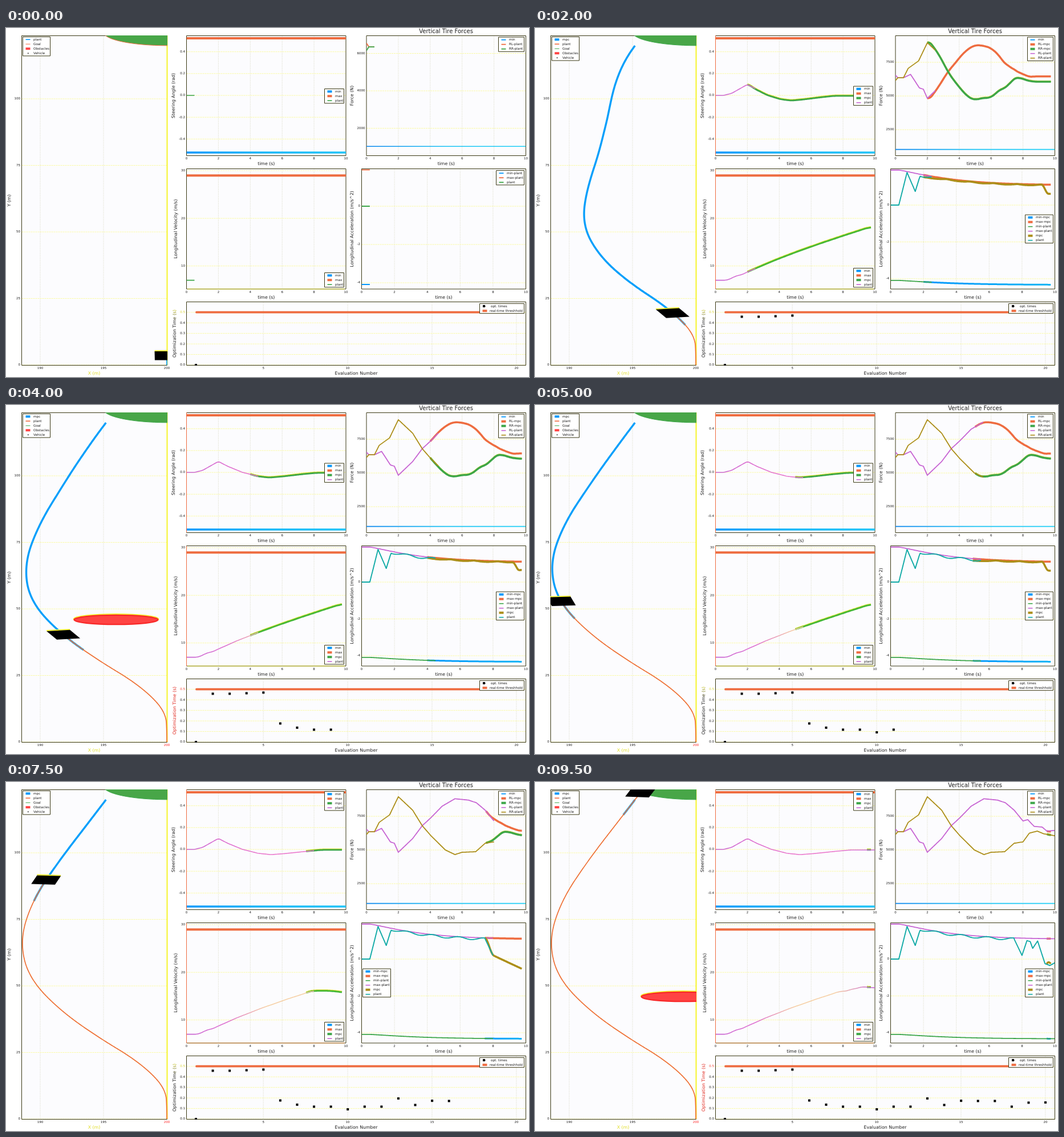
An HTML page with a canvas that plays this animation: 917x611 px, repeating every 10 s.

```html
<!DOCTYPE html>
<html lang="en">
<head>
<meta charset="utf-8">
<title>Vertical Tire Forces</title>
<style>
html, body { margin: 0; width: 100%; height: 100%; overflow: hidden; background: #fff; }
canvas { display: block; }
</style>
</head>
<body>
<canvas id="stage" width="917" height="611"></canvas>
<script>
const ctx = document.getElementById('stage').getContext('2d');
const FONT = '"DejaVu Sans", sans-serif';
const BLUE = '#0498fc', ORANGE = '#ee6c40', GREEN = '#3ca648', PURPLE = '#c765d3', GOLD = '#ac8e18',
  TEAL = '#10aaa6', RED = '#ff4444', YELLOW = '#f6f428', INK = '#1c1c1c', FRAME = '#3a3814';

const lerp = (a, b, u) => a + (b - a) * u;
const ease = u => {
  u = Math.min(Math.max(u, 0), 1);
  return u * u * (3 - 2 * u);
};

// Straight segments through t, value pairs
function keys(...p) {
  return t => {
    let i = 0;
    while (i < p.length - 4 && t > p[i + 2]) i += 2;
    const u = (t - p[i]) / (p[i + 2] - p[i]);
    return lerp(p[i + 1], p[i + 3], Math.min(Math.max(u, 0), 1));
  };
}
function soften(f, w) {
  return t => {
    let sum = 0;
    for (let i = -5; i <= 5; i++) sum += f(t + w * i / 5);
    return sum / 11;
  };
}

// The drive: acceleration and heading give speed and position
const settle = t => Math.exp(-((Math.max(0, t - .5) / 3.3) ** 1.2));
const accMax = t => 1.08 + .82 * settle(t);
const accMin = t => -4.33 + .24 * settle(t);
const launch = keys(0, 0, .5, 0, 1, 1.77, 1.5, .74, 1.8, 1.6);
const brake = keys(7.5, 1.13, 8, .2, 8.3, 1, 8.5, .95, 8.65, .58, 8.95, .98, 9.4, -.25, 9.7, -.35, 10, -.2);
const accel = t => t < 1.8 ? launch(t) : t > 7.5 ? brake(t) : accMax(t) - .06 * (1 + Math.sin(4 * t));
const heading = keys(0, 0, 1, .01, 2, .19, 3.2, .335, 4, .295, 5, .2, 6, .05, 7, -.065, 8, -.14, 9, -.162, 10, -.16);
const steer = soften(keys(.5, 0, 1, .018, 2, .1, 2.6, .055, 3.5, .001, 4.5, -.036, 5.3, -.048, 6.2, -.038, 7.5, -.018, 8.5, -.005), .1);
const rearL = keys(0, 6.55, .15, 6.35, .5, 6.35, .95, 6.6, 1.5, 5.6, 1.75, 5.5, 2, 4.83, 2.9, 5.85, 3.5, 6.8, 4.05, 7.4,
  4.75, 8.25, 5.55, 8.8, 6.4, 8.7, 6.9, 8.5, 7.45, 7.95, 8, 7.15, 8.3, 7.25, 8.7, 6.75, 9.2, 6.7, 9.5, 6.4, 10, 6.45);
const rearR = keys(0, 6.15, .15, 6.35, .5, 6.35, .8, 7.05, 1.45, 7.6, 2, 8.95, 2.9, 7.95, 3.5, 6.8, 4.05, 6.05, 4.95, 5,
  5.55, 4.66, 6, 4.83, 6.85, 4.87, 7.45, 5.5, 8, 5.6, 8.4, 6.25, 8.9, 6.4, 9.3, 6.2, 10, 6.05);

const DT = .02, run = [];
for (let i = 0, x = 200, y = 0, v = 7; i <= 550; i++) {
  const t = i * DT, a = heading(t);
  run.push({ x, y, v });
  x -= v * Math.sin(a) * DT;
  y += v * Math.cos(a) * DT;
  v += accel(t) * DT;
}
const at = t => run[Math.round(t / DT)];
const speed = t => at(t).v;

// The first plans swerve hard
const first = {
  steer: soften(keys(1, .02, 1.6, .068, 2.85, .173, 3.7, .207, 5.5, .12, 7.35, .016, 10, -.094), .2),
  left: soften(keys(1, 6.65, 2.85, 2.4, 3.7, 2.2, 5.45, 3.27, 6.25, 4.45, 7.35, 5.7, 7.7, 5.75, 10, 7.3), .1),
  right: soften(keys(1, 7.2, 1.57, 7.86, 2.85, 9.95, 3.7, 10.65, 4.55, 10.2, 5.45, 9.25, 6.25, 7.6, 7.4, 6.15, 10, 5.35), .1),
  accel: keys(1, 1.7, 1.55, .58, 2.85, -.35, 3.7, .32, 4.57, .51, 6.85, -1.19, 7.4, -1.12, 10, -.05),
  max: keys(1, 1.76, 5.4, 1.67, 8.4, 2, 10, 2.07),
  min: keys(1, -4.13, 5, -4.18, 10, -4.04)
};

// A plan leaves the driven curve where it starts
function join(actual, plan, t0) {
  const gap = actual(t0) - plan(t0);
  return t => plan(t) + gap * Math.exp(-1.5 * (t - t0));
}
// Later plans foresee the drive, a little too fast
function foresee(actual, w, early, k) {
  const t0 = k / 2, soft = soften(actual, w);
  return join(actual, k < 3 ? early : t => soft(t0 + (t - t0) * (1 + .8 / k)), t0);
}
function planAccel(k) {
  const t0 = k / 2;
  if (k < 3) return join(accel, first.accel, t0);
  const push = t => accMax(t) - .05 * Math.abs(Math.sin(2.2 * (t - t0))) - .45 * ease((t - 9.2) / .4);
  const slow = t => accMax(t) - .93 * ease((t - t0) / .55) - .4 * Math.max(0, t - t0 - .5);
  return join(accel, k < 15 ? push : slow, t0);
}
function planSpeed(k) {
  const a = planAccel(k);
  return t => {
    let v = speed(k / 2);
    for (let s = k / 2; s < t - .01; s += .05) v += a(s) * .05;
    return v;
  };
}

function stroke(pts, color, w) {
  ctx.beginPath();
  pts.forEach(p => ctx.lineTo(p[0], p[1]));
  ctx.strokeStyle = color;
  ctx.lineWidth = w;
  ctx.stroke();
}
const line = (x1, y1, x2, y2, color, w) => stroke([[x1, y1], [x2, y2]], color, w);

function text(s, x, y, size, align = 'center', color = INK) {
  ctx.font = size + 'px ' + FONT;
  ctx.textAlign = align;
  ctx.textBaseline = 'middle';
  ctx.fillStyle = color;
  ctx.fillText(s, x, y);
}
function upright(s, x, y, color) {
  ctx.save();
  ctx.translate(x, y);
  ctx.rotate(-Math.PI / 2);
  text(s, 0, 0, 7.8, 'center', color);
  ctx.restore();
}
function gradient(l, r, ...colors) {
  const g = ctx.createLinearGradient(l, 0, r, 0);
  colors.forEach((c, i) => g.addColorStop(i / (colors.length - 1), c));
  return g;
}
function ellipse(x, y, rx, ry, fill, edge, w) {
  ctx.beginPath();
  ctx.ellipse(x, y, rx, ry, 0, 0, 7);
  ctx.fillStyle = fill;
  ctx.fill();
  ctx.strokeStyle = edge;
  ctx.lineWidth = w;
  ctx.stroke();
}

// xs and ys hold [pixel, label] ticks
function panel(l, t, r, b, xs, ys) {
  ctx.fillStyle = '#fcfcfe';
  ctx.fillRect(l, t, r - l, b - t);
  ctx.setLineDash([1, 2]);
  for (const [x, s, c] of xs) {
    if (x > l + 1 && x < r - 1) line(x, t, x, b, '#cfcfb4', 1);
    text(s, x, b + 5.3, 5.5, 'center', c);
  }
  ctx.setLineDash([3, 1]);
  for (const [y, s, c] of ys) {
    line(l, y, r, y, '#fbfaa6', 1);
    text(s, l - 2.5, y, 5.5, 'right', c);
  }
  ctx.setLineDash([]);
  ctx.strokeStyle = FRAME;
  ctx.lineWidth = 1;
  ctx.strokeRect(l, t, r - l, b - t);
}
function inside(l, t, r, b, draw) {
  ctx.save();
  ctx.beginPath();
  ctx.rect(l, t, r - l, b - t);
  ctx.clip();
  draw();
  ctx.restore();
}

// Time graph: zero is the pixel of value 0, unit the pixels per value
function graph({ l, t, r, b, zero, unit, ticks, digits = 0, name, nameX, factor = 1 }, draw) {
  const X = s => lerp(l, r, s / 10), Y = v => zero - v * unit;
  panel(l, t, r, b, [0, 2, 4, 6, 8, 10].map(s => [X(s), s]), ticks.map(v => [Y(v), (v * factor).toFixed(digits)]));
  text('time (s)', (l + r) / 2, b + 14.8, 7.8);
  upright(name, nameX, (t + b) / 2);
  const plot = (f, from, to, color, w, dy = 0) => {
    const pts = [];
    for (let s = from; s <= to + .001; s += .05) pts.push([X(s), Y(f(s)) + dy]);
    stroke(pts, color, w);
  };
  inside(l, t, r, b, () => draw(plot, X));
}

// rows: [label, colour, width]; width 0 marks a point
function legend(x, y, w, rows, gap = 18.5) {
  ctx.fillStyle = '#fff';
  ctx.strokeStyle = FRAME;
  ctx.lineWidth = 1;
  ctx.beginPath();
  ctx.rect(x, y, w, rows.length * 8.1 + 1);
  ctx.fill();
  ctx.stroke();
  rows.forEach(([s, c, lw], i) => {
    const cy = y + 4.7 + i * 8;
    if (lw) line(x + 5, cy, x + 13, cy, c, lw);
    else {
      ctx.fillStyle = '#000';
      ctx.fillRect(x + 8.5, cy - .7, 1.5, 1.5);
    }
    text(s, x + gap, cy, 5.7, 'left');
  });
}

const roadX = x => 282 + (x - 200) * 22.2, roadY = y => 590 - y * 4.66;

function drawPlan(k) {
  if (k < 3) {
    stroke([[282, 557], [278, 540], [259, 516], [209, 489.5], [108, 466], [27, 458]], BLUE, 3.2);
    stroke([[259, 516], [209, 489.5], [108, 466]], '#16e4f6', 2.2);
    return line(27, 59, 175.5, 30, BLUE, 3.4);
  }
  const y0 = at(k / 2).y, goal = 120.2, pts = [];
  const bulge = 3.1 * Math.min(1, Math.exp((4 - k) / 2.2));
  for (const p of run.slice(k * 25)) {
    if (p.y > goal) break;
    const u = (p.y - y0) / (goal - y0);
    pts.push([roadX(p.x + bulge * Math.sin(Math.PI * u ** 1.23) ** 2), roadY(p.y)]);
  }
  stroke(pts, '#079ffb', 3.4);
}

function drawVehicle(t) {
  const p = at(t), a = heading(t), c = Math.cos(a), s = Math.sin(a);
  const body = [[-.95, 1.65], [.95, 1.65], [.95, -1.65], [-.95, -1.65]]
    .map(([u, v]) => [roadX(p.x + u * c - v * s), roadY(p.y + u * s + v * c)]);
  stroke(body.slice(0, 2).map(q => [q[0], q[1] - .8]), YELLOW, 2);
  ctx.beginPath();
  body.forEach(q => ctx.lineTo(q[0], q[1]));
  ctx.fillStyle = '#000';
  ctx.fill();
}

function drawRoad(k, hot) {
  panel(27.5, 13.5, 282.5, 590.5, [190, 195, 200].map(x => [roadX(x), x, k >= 8 && x === 200 ? '#f22' : INK]),
    [0, 25, 50, 75, 100].map(y => [roadY(y), y]));
  line(282.5, 13, 282.5, 590, YELLOW, 2);
  inside(27, 13, 283, 591, () => {
    ellipse(282, 7.5, 111, 23.3, '#48a648', k ? GREEN : ORANGE, 1);
    if (hot) {
      const x = 193 + (k - 8) * 6.1;
      ellipse(x, 374.8, 74, 8.5, RED, YELLOW, 2.5);
      ellipse(x, 376, 73.5, 8.2, RED, '#f82828', 2.2);
    }
    if (k) drawPlan(k);
    const T = (k + 1) / 2;
    stroke(run.slice(0, T / DT + 1).map(p => [roadX(p.x), roadY(p.y)]), k ? '#ee7034' : BLUE, 1.7);
    drawVehicle(T);
  });
  const rows = [['plant', k ? ORANGE : BLUE, 1.6], ['Goal', k ? GREEN : ORANGE, 1], ['Obstacles', RED, 4], ['Vehicle', '', 0]];
  if (k) rows.unshift(['mpc', BLUE, 4]);
  legend(29.5, k === 1 || k === 2 ? 546.5 : 15.5, 48, rows);
  upright('Y (m)', 5.5, 302);
  text('X (m)', 154.5, 605, 7.8, 'center', '#e0dc20');
}

const limitRows = k => [['min', BLUE, 4], ['max', ORANGE, 4]].concat(
  k ? [['mpc', GREEN, 4], ['plant', PURPLE, 1.6]] : [['plant', GREEN, 1.6]]);

function drawPair(plot, k, end, actual, plan, color, late) {
  if (k) {
    plot(plan, k / 2, end, '#dde028', 2.8, -1);
    plot(plan, k / 2, end, color, 2.8);
  }
  plot(actual, 0, (k + 1) / 2, k ? gradient(316, 596, PURPLE, '#de70d0', late, late, PURPLE) : GREEN, 1.6);
}

function drawSteer(k, mode, end) {
  const r = mode === 1 ? 594 : 596;
  graph({ l: 316.5, t: 13.5, r, b: 223.5, zero: 118, unit: 191, ticks: [.4, .2, 0, -.2, -.4], digits: 1,
    name: 'Steering Angle (rad)', nameX: 294 }, plot => {
    plot(() => .5236, 0, 10, ORANGE, 4);
    plot(() => -.5236, 0, 10, gradient(316, r, BLUE, '#18b8f8', '#20c4f8'), 3.6);
    drawPair(plot, k, end, steer, foresee(steer, .2, first.steer, k), GREEN, '#ea78cc');
  });
  if (k >= 4) line(316.5, 13, 316.5, 223, ORANGE, 1);
  legend(mode === 1 ? 437.5 : 558.5, mode === 0 ? 106.5 : k >= 14 ? 16.5 : 102, 34, limitRows(k));
}

function drawSpeed(k, mode, end) {
  const r = mode === 1 ? 594 : 596;
  graph({ l: 316.5, t: 246.5, r, b: 457, zero: 500, unit: 8.34, ticks: [30, 20, 10],
    name: 'Longitudinal Velocity (m/s)', nameX: 298 }, plot => {
    plot(() => 29, 0, 10, ORANGE, 4);
    drawPair(plot, k, end, speed, planSpeed(k), '#44b838', '#f6cfa4');
  });
  if (k >= 4) line(316.5, 247, 316.5, 457, ORANGE, 1);
  line(318, 457, 594, 457, k >= 12 ? '#f0a050' : '#e6e23a', 1);
  legend(mode === 1 ? 556.5 : 558.5, [428.5, 335, 420.5][mode], 34, limitRows(k));
}

// Scales for start, first plans and the rest
const FORCE = [
  { l: 632, zero: 241, unit: 32.75, ticks: [6, 4, 2] },
  { l: 633.5, zero: 234, unit: 19.6, ticks: [10, 8, 6, 4, 2] },
  { l: 632, zero: 237, unit: 23.6, ticks: [7.5, 5, 2.5] }
];
const ACCEL = [
  { l: 623.5, zero: 312, unit: 33.5, ticks: [0, -2, -4] },
  { l: 627, zero: 315, unit: 31.2, ticks: [0, -2.5], digits: 1 },
  { l: 623.5, zero: 310, unit: 32.25, ticks: [0, -2, -4] }
];

function drawForce(k, mode, end) {
  const ax = FORCE[mode], t = k / 2, T = mode === 1 ? t : t + .5;
  graph({ ...ax, t: 13.5, r: 911.5, b: 223.5, factor: 1000, name: 'Force (N)', nameX: 606.5 }, plot => {
    plot(() => 1.03, 0, 10, gradient(ax.l, 911, '#0a86ee', '#1cc4f4', '#22d0f6'), 1.7);
    if (k) {
      const right = foresee(rearR, .35, first.right, k);
      plot(foresee(rearL, .35, first.left, k), t, end, ORANGE, 3.5);
      plot(right, t, end, '#b8cc30', 3, -.8);
      plot(right, t, end, GREEN, 3.3);
    }
    plot(rearL, 0, T, k ? PURPLE : ORANGE, 1.8);
    plot(rearR, 0, T, k ? GOLD : GREEN, 1.8);
  });
  text('Vertical Tire Forces', (ax.l + 911) / 2, 6.3, 10);
  legend(863.5, 16, 45, [['min', BLUE, 1.8]].concat(k ?
    [['RL-mpc', ORANGE, 4], ['RR-mpc', GREEN, 4], ['RL-plant', PURPLE, 1.6], ['RR-plant', GOLD, 1.6]] :
    [['RL-plant', ORANGE, 1.8], ['RR-plant', GREEN, 1.8]]));
}

function drawAccel(k, mode, end) {
  const t = k / 2, T = mode === 1 ? t : t + .5, early = mode === 1;
  graph({ ...ACCEL[mode], t: 246.5, r: 911.5, b: 457, name: 'Longitudinal Acceleration (m/s^2)', nameX: 606.5 }, (plot, X) => {
    if (k) {
      plot(early ? first.min : accMin, t, end, gradient(X(t), 911, BLUE, '#12b4f4'), 3);
      plot(early ? first.max : accMax, t, end, ORANGE, 3.5);
    }
    plot(accMin, 0, T, k ? GREEN : BLUE, 1.8);
    plot(accMax, 0, T, k ? PURPLE : ORANGE, 1.8);
    if (k) plot(planAccel(k), t, end, GOLD, 3.5);
    plot(accel, 0, T, k ? TEAL : GREEN, 1.9);
  });
  if (!k) legend(859.5, 249.5, 49, [['min-plant', BLUE, 1.8], ['max-plant', ORANGE, 1.8], ['plant', GREEN, 1.8]]);
  else legend(early ? 629.5 : k >= 14 && k <= 17 ? 625.5 : 859.5, 327, 49,
    [['min-mpc', BLUE, 4], ['max-mpc', ORANGE, 4], ['min-plant', GREEN, 1.6],
      ['max-plant', PURPLE, 1.6], ['mpc', GOLD, 4], ['plant', TEAL, 1.6]]);
}

// Solve times in milliseconds
const solve = [0, 458, 458, 463, 469, 176, 136, 117, 117, 92, 117, 117, 195, 133, 173, 171, 171, 117, 155, 157];

function drawOpt(k, hot) {
  panel(316.5, 479.5, 911.5, 590.5, [5, 10, 15, 20].map(n => [303.3 + n * 29.58, n]),
    [0, 1, 2, 3, 4, 5].map(n => [590 - n * 18.45, '0.' + n, n < 5 ? INK : hot ? '#f04030' : '#d8d430']));
  inside(316, 479, 912, 591, () => {
    ctx.lineCap = 'round';
    line(334, 497.7, 894, 497.7, ORANGE, 3.8);
    ctx.lineCap = 'butt';
    ctx.fillStyle = '#000';
    for (let i = 0; i <= k; i++) ctx.fillRect(331 + i * 29.58, 588 - solve[i] * .1845, 4, 4);
  });
  upright('Optimization Time (s)', 296, 535, hot ? '#e02a20' : gradient(-44, 44, INK, INK, INK, INK, '#dcd820'));
  text('Evaluation Number', 614, 605, 7.8);
  legend(830.5, 482.5, 78, [['', '', 0], ['real-time threshhold', ORANGE, 4]], 17.5);
  ctx.fillStyle = '#000';
  ctx.fillRect(836, 485, 4, 4);
  text('opt. times', 850, 487.2, 5.7, 'left');
}

function draw(k) {
  const mode = k === 0 ? 0 : k < 3 ? 1 : 2, end = mode === 1 ? 10 : 9.75;
  const hot = k === 8 || k === 19; // obstacle in view
  ctx.fillStyle = '#fff';
  ctx.fillRect(0, 0, 917, 611);
  ctx.lineJoin = 'round';
  drawRoad(k, hot);
  drawSteer(k, mode, end);
  drawForce(k, mode, end);
  drawSpeed(k, mode, end);
  drawAccel(k, mode, end);
  drawOpt(k, hot);
}

const start = performance.now();
let shown = -1;
function tick() {
  const k = Math.floor((performance.now() - start) % 10000 / 500);
  if (k !== shown) draw(shown = k);
  requestAnimationFrame(tick);
}
tick();
</script>
</body>
</html>
```
